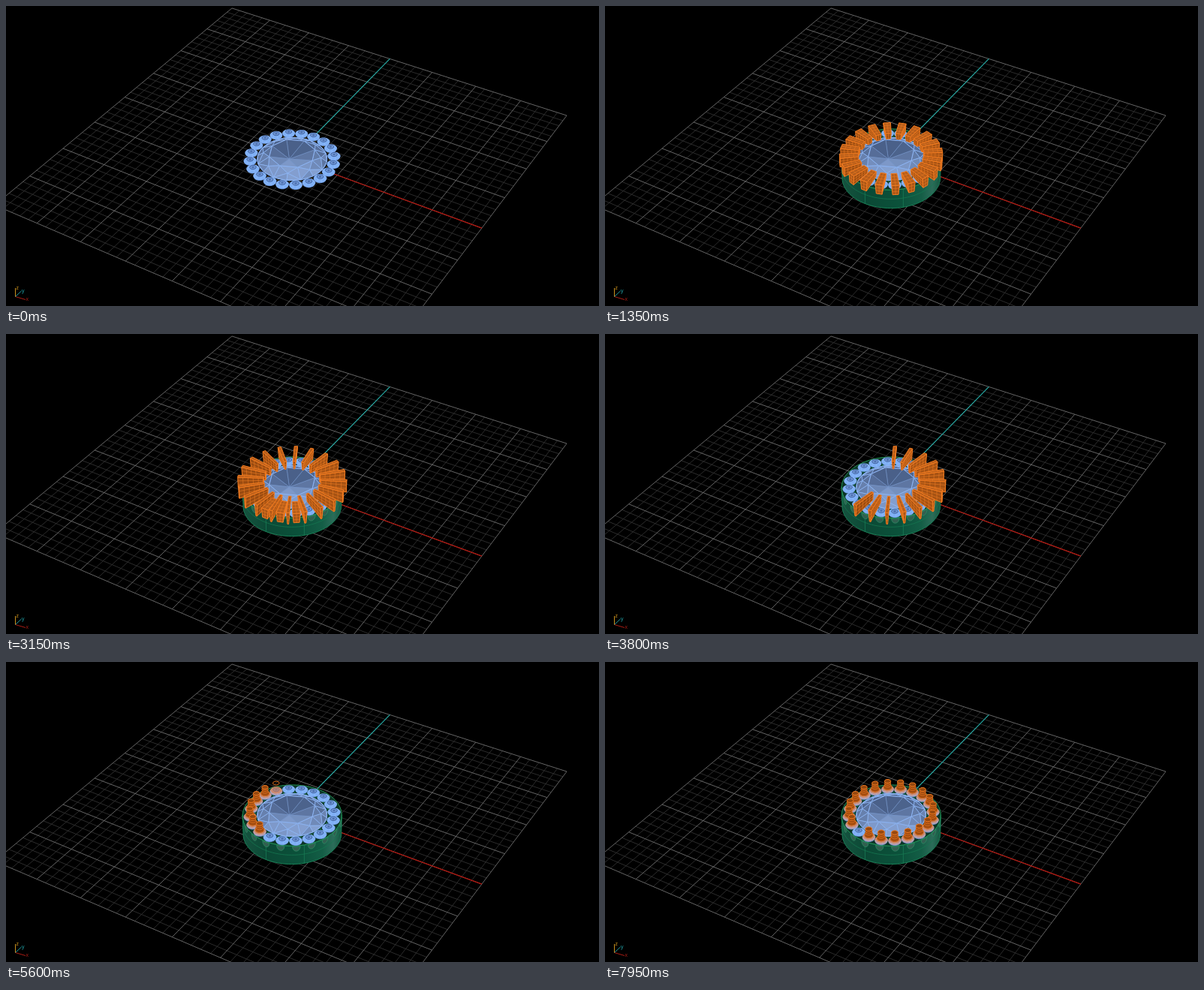
Animation of 790 by 400 pixels, one loop 8 s. Source, as an HTML page with a canvas:

```html
<!DOCTYPE html>
<html lang="en">
<head>
<meta charset="utf-8">
<title>Halo setting</title>
<style>
html, body { margin: 0; width: 100%; height: 100%; overflow: hidden; background: #000; }
canvas { display: block; }
</style>
</head>
<body>
<canvas id="stage" width="790" height="400"></canvas>
<script>
const ctx = document.getElementById('stage').getContext('2d');
const LOOP = 8000, STEP = 50, COUNT = 20, RAD = Math.PI / 180;
const CAMERA_ANGLE = -59.4;
const ORANGE = '#f47c20';

// Perspective camera, z up, one unit per small grid cell.
const depth = (x, y, z) => 1 - 0.003125 * x + 0.005115 * y - 0.004555 * z;
function project(x, y, z = 0) {
  const w = depth(x, y, z);
  return [(381.2 + 10.653 * x + 9.125 * y - 1.8 * z) / w,
          (203.4 + 3.711 * x - 6.289 * y - 11.88 * z) / w];
}
function polar(r, deg, z = 0) {
  return project(r * Math.cos(deg * RAD), r * Math.sin(deg * RAD), z);
}
const frontness = deg => Math.cos((deg - CAMERA_ANGLE) * RAD);

function arc(r, z, from, to, n = 48) {
  return Array.from({ length: n + 1 }, (_, i) => polar(r, from + (to - from) * i / n, z));
}
function disc(cx, cy, r, z, n = 16) {
  return Array.from({ length: n }, (_, i) => {
    const a = i * 2 * Math.PI / n;
    return project(cx + r * Math.cos(a), cy + r * Math.sin(a), z);
  });
}
function shape(points, fill, stroke, width = 1, closed = true) {
  ctx.beginPath();
  points.forEach(p => ctx.lineTo(p[0], p[1]));
  if (closed) ctx.closePath();
  if (fill) { ctx.fillStyle = fill; ctx.fill(); }
  if (stroke) { ctx.strokeStyle = stroke; ctx.lineWidth = width; ctx.stroke(); }
}
const line = (a, b, color, width) => shape([a, b], null, color, width, false);
const mix = (a, b, k) => [a[0] + (b[0] - a[0]) * k, a[1] + (b[1] - a[1]) * k];

function drawGrid() {
  for (const major of [false, true]) {
    for (let i = -20; i <= 20; i++) {
      if ((i % 5 === 0) !== major) continue;
      const color = major ? '#707070' : '#303030';
      line(project(i, -20), project(i, 20), color, 0.9);
      line(project(-20, i), project(20, i), color, 0.9);
    }
  }
  line(project(0, 0), project(20, 0), '#b3140c', 1.1);
  line(project(0, 0), project(0, 20), '#20aaa4', 1.1);
}

function drawAxisIcon() {
  const origin = [12.5, 387.5];
  const axes = [['x', 26, 391.5, '#a81c14'], ['y', 20.5, 380, '#1f9ba0'], ['z', 12.5, 376, '#c8901c']];
  ctx.font = '7px Arial, "Liberation Sans", sans-serif';
  for (const [name, x, y, color] of axes) {
    line(origin, [x, y], color, 1);
    ctx.fillStyle = color;
    ctx.fillText(name, x + (name === 'z' ? 1 : 0.5), y + 1.5);
  }
}

function drawBezel(isSeatCut) {
  const R = 4.77, bottom = -2.22, left = CAMERA_ANGLE - 90, right = CAMERA_ANGLE + 90;
  const side = [...arc(R, 0, left, right), ...arc(R, bottom, right, left)];
  const tone = ctx.createLinearGradient(316, 0, 448, 0);
  [[0, '#16533f'], [0.25, '#0b4935'], [0.6, '#0b523b'], [0.8, '#145e46'], [0.91, '#2c6c59'], [1, '#12543d']]
    .forEach(([at, color]) => tone.addColorStop(at, color));
  shape(side, tone, '#178157');
  shape(arc(R, -1.1, left, right), null, '#167650', 0.8, false);
  for (const deg of [-90, -45]) line(polar(R, deg), polar(R, deg, bottom), '#187a55', 0.8);
  shape(arc(R, 0, 0, 360), '#0b3526', '#249456');
  for (let i = 0; i < COUNT; i++) {
    const deg = 252 - 18 * i;
    if (!isSeatCut(i) || frontness(deg) < 0.1) continue;
    const seat = Array.from({ length: 9 }, (_, k) => {
      const a = k * Math.PI / 8;
      return polar(R, deg - 4.5 * Math.cos(a), -0.1 - 0.55 * Math.sin(a));
    });
    shape(seat, '#315f50', '#2b8b62', 0.8);
  }
}

function drawStone(deg, covered) {
  const cx = 4.05 * Math.cos(deg * RAD), cy = 4.05 * Math.sin(deg * RAD);
  shape(disc(cx, cy, 0.57, -0.12), '#638fd2');
  const girdle = disc(cx, cy, 0.6, 0.02);
  const table = disc(cx, cy, 0.32, 0.2, 8);
  shape(girdle, covered ? '#b5a0b6' : '#7eaff5', covered ? '#ca9b98' : '#8ab8ff', 0.8);
  table.forEach((p, i) => line(p, girdle[i * 2], '#9bc1fa', 0.5));
  shape(table, '#7197d5', '#3d5f9e', 0.9);
  shape(disc(cx, cy, 0.13, 0.2, 6), '#466aa9');
}

function drawGem() {
  const shade = (deg, boost = 0) => {
    const k = Math.max(0, Math.min(1, (frontness(deg) + 1) / 2 + boost)) ** 1.5;
    return `rgb(${74 + 58 * k},${96 + 64 * k},${137 + 72 * k})`;
  };
  const edge = '#8fb6f5';
  shape(arc(3.36, 0, 0, 360), '#617eae', edge);
  for (let i = 0; i < 8; i++) {
    const a = i * 45, b = a + 45, m = a + 22.5;
    const tableA = polar(2.25, a, 0.65), tableB = polar(2.25, b, 0.65);
    const star = polar(2.8, m, 0.4);
    const girdleA = polar(3.36, a), girdleM = polar(3.36, m), girdleB = polar(3.36, b);
    shape([tableA, tableB, star], shade(m), edge, 0.8);
    shape([tableA, star, girdleA], shade(a), edge, 0.8);
    shape([tableB, star, girdleB], shade(b), edge, 0.8);
    shape([star, girdleA, girdleM], shade(m, -0.1), edge, 0.8);
    shape([star, girdleM, girdleB], shade(m, 0.1), edge, 0.8);
  }
  const center = project(-0.2, -0.2, 0);
  for (let i = 0; i < 8; i++) {
    const a = polar(2.25, i * 45, 0.65), b = polar(2.25, i * 45 + 45, 0.65);
    shape([center, a, b], shade(i * 45 + 22.5, -0.08), '#7798cc', 0.6);
  }
  shape(Array.from({ length: 8 }, (_, i) => polar(2.25, i * 45, 0.65)), null, edge, 0.9);
}

// Quad with a mesh of inner lines; corners run clockwise when it faces the viewer.
function meshFace([a, b, c, d], fill, cols, rows) {
  const area = (c[0] - a[0]) * (d[1] - b[1]) - (c[1] - a[1]) * (d[0] - b[0]);
  if (area < 0) return;
  shape([a, b, c, d], fill, ORANGE, 1);
  for (let i = 1; i < cols; i++) line(mix(a, b, i / cols), mix(d, c, i / cols), '#e87922', 0.6);
  for (let i = 1; i < rows; i++) line(mix(a, d, i / rows), mix(b, c, i / rows), '#e87922', 0.6);
}

const BLOCK = { inner: 3.15, outer: 4.93, low: 0, lowOuter: -0.45, high: 0.65, top: 0.36, base: 0.28, across: 2 };
const PLATE = { inner: 2.75, outer: 5.22, low: 0.05, lowOuter: -0.38, high: 0.98, top: 0.16, base: 0.06, across: 1 };

function drawWedge(deg, s) {
  const c = Math.cos(deg * RAD), n = Math.sin(deg * RAD);
  const at = (r, side, z) => project(r * c - side * n, r * n + side * c, z);
  const end = (r, low, k) => [
    at(r, -s.top * k, s.high), at(r, s.top * k, s.high),
    at(r, s.base * k, low), at(r, -s.base * k, low)];
  const [it0, it1, ib1, ib0] = end(s.inner, s.low, 0.75);
  const [ot0, ot1, ob1, ob0] = end(s.outer, s.lowOuter, 1);
  meshFace([ot1, it1, ib1, ob1], '#9a4b10', 5, 3);
  meshFace([it0, ot0, ob0, ib0], '#a65213', 5, 3);
  meshFace([it1, it0, ib0, ib1], '#91480f', s.across, 3);
  meshFace([ot0, ot1, ob1, ob0], '#a95516', s.across, 3);
  meshFace([it0, it1, ot1, ot0], '#b65d1a', s.across, 4);
}

function drawCutter(deg, phase) {
  const cx = 4.05 * Math.cos(deg * RAD), cy = 4.05 * Math.sin(deg * RAD);
  shape(disc(cx, cy, 0.52, 0.15), 'rgba(218,122,68,.6)', '#d98b5c', 0.8);
  if (phase < 0.3) return;
  if (phase >= 0.6) {
    for (let z = 0.2; z < 1; z += 0.1) shape(disc(cx, cy, z < 0.45 ? 0.4 : 0.3, z), '#a64e10');
    for (const z of [0.25, 0.5, 0.75]) {
      shape(disc(cx, cy, z < 0.45 ? 0.4 : 0.31, z), '#a14b0f', '#e27420', 0.8);
    }
  }
  shape(disc(cx, cy, 0.31, 1), phase < 0.6 ? null : '#96480f', ORANGE, 1);
}

function render(time) {
  const t = Math.floor(time % LOOP / STEP) * STEP;
  const reached = (i, start, pace) => t >= start + i * pace;
  const parts = [];
  const add = (deg, draw) => parts.push({ front: frontness(deg), draw });
  const cutterPhase = i => reached(i, 7850, 160) ? -1 : (t - 4564) / 160.6 - i;

  for (let i = 0; i < COUNT; i++) {
    const stone = 252 - 18 * i, between = 243 - 18 * i;
    if (reached(i, 100, 60) && !reached(i, 2600, 34)) add(stone, () => drawWedge(stone, BLOCK));
    if (reached(i, 1400, 65) && !reached(i, 3400, 60)) add(between, () => drawWedge(between, PLATE));
    const phase = cutterPhase(i);
    if (phase >= 0) add(stone, () => drawCutter(stone, phase));
  }

  ctx.fillStyle = '#000';
  ctx.fillRect(0, 0, 790, 400);
  ctx.lineJoin = 'round';
  drawGrid();
  drawAxisIcon();
  if (t >= 100) drawBezel(i => reached(i, 2600, 34));
  else shape(arc(4.05, 0, 0, 360), '#080b12');

  Array.from({ length: COUNT }, (_, i) => i)
    .sort((a, b) => frontness(252 - 18 * a) - frontness(252 - 18 * b))
    .forEach(i => drawStone(252 - 18 * i, cutterPhase(i) >= 0));
  drawGem();
  for (let i = 0; i < COUNT; i++) {
    const [x, y] = polar(3.55, 9 + 18 * i);
    ctx.fillStyle = t >= 100 ? '#1b7046' : '#51451d';
    ctx.fillRect(x - 0.8, y - 0.8, 1.6, 1.6);
  }
  parts.sort((a, b) => a.front - b.front).forEach(part => part.draw());
}

function tick() {
  render(performance.now());
  requestAnimationFrame(tick);
}
tick();
</script>
</body>
</html>
```
